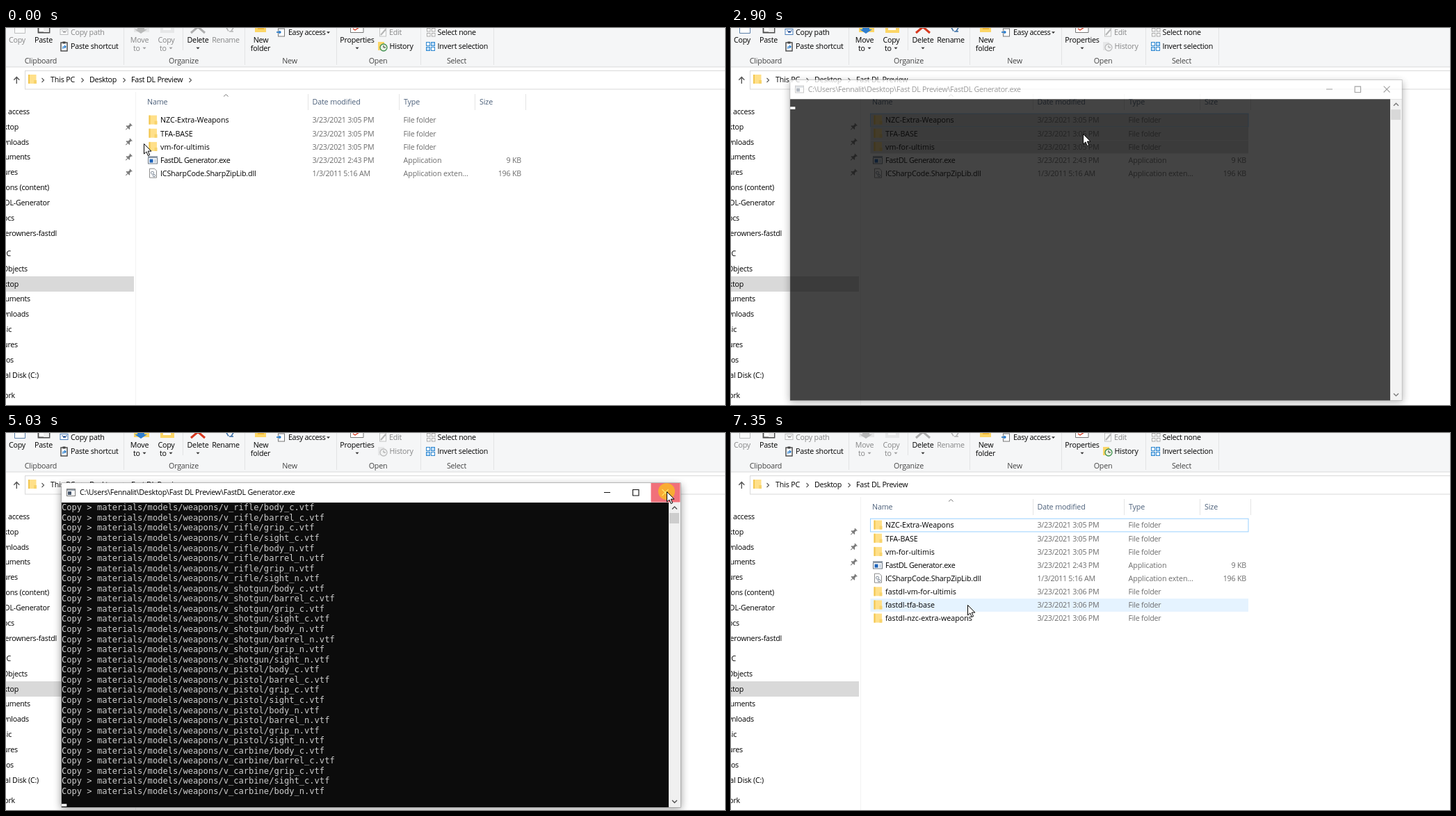
Recreate the animation shown at these times as an HTML page. Size 1034 by 542 pixels, loop 7.43 s.

```html
<!DOCTYPE html>
<html lang="en">
<head>
<meta charset="utf-8">
<title>Folder window</title>
<style>
html, body { margin: 0; width: 100%; height: 100%; overflow: hidden; background: #fff; }
svg { display: block; width: 100%; height: 100%; }
text { font: 10.7px "Open Sans", "Noto Sans", sans-serif; letter-spacing: -.22px; fill: #000; }
.grey { fill: #6d6d6d; }
.head { fill: #4c607a; }
.label { fill: #444; }
.mono text { font: 12.09px "DejaVu Sans Mono", "Noto Sans Mono", monospace; letter-spacing: 0; fill: #ccc; }
.dim, .act, .multi .his { opacity: .45; filter: grayscale(1); }
.sel .act { opacity: 1; filter: none; }
</style>
</head>
<body>
<svg id="stage" viewBox="0 0 1034 542" preserveAspectRatio="none">
  <defs><filter id="blur" x="-10%" y="-10%" width="120%" height="120%"><feGaussianBlur stdDeviation="6"/></filter></defs>
</svg>
<script>
const LOOP = 7430, ROW = 19.15, TOP = 123, LINE = 14.56, WIN_W = 890, WIN_H = 466;
const stage = document.getElementById('stage');

function el(tag, attrs, parent = stage, content = '') {
  const node = document.createElementNS('http://www.w3.org/2000/svg', tag);
  for (const k in attrs) node.setAttribute(k, attrs[k]);
  node.innerHTML = content;
  parent.appendChild(node);
  return node;
}
const esc = s => s.replace(/>/g, '&gt;');
const attr = (cls, x, y, anchor, gap) => `class="${cls}" x="${x}" y="${y}" text-anchor="${anchor}" style="${gap == null ? '' : `letter-spacing:${gap}px`}"`;
// y is the middle of the line
const text = (x, y, s, cls = '', anchor = 'start', gap) => `<text ${attr(cls, x, y + 3.8, anchor, gap)}>${esc(s)}</text>`;
const mid = (x, y, s, cls = '') => text(x, y, s, cls, 'middle');
const rect = (x, y, w, h, fill, extra = '') => `<rect x="${x}" y="${y}" width="${w}" height="${h}" fill="${fill}" ${extra}/>`;
const path = (d, stroke, w = 1, fill = 'none') => `<path d="${d}" stroke="${stroke}" stroke-width="${w}" fill="${fill}"/>`;
const caret = (x, y) => `<path d="M${x - 2.5} ${y - 1.2}h5l-2.5 2.8z" fill="#333"/>`;
const chevron = (x, y) => path(`M${x - 1.5} ${y - 3}l3 3l-3 3`, '#555', 1.1);
const group = (cls, s) => `<g class="${cls}">${s}</g>`;
const folder = (x, y) => rect(x, y, 11.5, 13, '#ffe08a') + rect(x, y, 2, 13, '#f2c64f') + rect(x + 8, y + 8, 4, 5, '#f7d36c');
const show = (node, on) => node.setAttribute('display', on ? 'inline' : 'none');
const place = (node, attrs) => { for (const k in attrs) node.setAttribute(k, attrs[k]); };

function ribbon() {
  let s = rect(0, 0, 1034, 56, '#f5f6f7') + rect(0, 55.5, 1034, 1, '#dadbdc');
  for (const x of [169, 343, 475, 596, 701]) s += rect(x, 0, 1, 53, '#e2e3e4');
  s += rect(254, 0, 1, 32, '#e2e3e4');
  s += group('act',
    path('M12.5 -2V7.5H27.5V-2', '#5a7fa8', 1, '#fff') + mid(16, 17, 'Copy') +
    rect(78, 1.5, 11, 8, '#fff', 'stroke="#4a7ebb"') + path('M80 4h2l1 3l1-3l1 3l1-3h2', '#2b579a') + text(93, 6.5, 'Copy path') +
    path('M184 -1h22v7h-22z', 'none', 0, '#fcd667') + path('M189 -1v3h-4l9 6l9-6h-4v-3z', 'none', 0, '#2f7fd0') +
    mid(192, 17, 'Move') + text(183, 29, 'to') + caret(199, 29) +
    rect(222, -1, 20, 8, '#fcd667') + rect(226, -1, 11, 4, '#fff') + mid(230.5, 17, 'Copy') + text(221, 29, 'to') + caret(237, 29) +
    path('M266 7l14-12M286 7l-14-12', '#d8391f', 3) +
    path('M316 -2l4 6.5M328 -2l-4 6.5M321 5h6', '#3a6ea5', 1.5) + mid(316, 17, 'Rename'));
  s += path('M46.5 -2V6.5H62.5V-2', '#4d4d4d', 1.8, '#fff') + rect(54, -1, 8, 7, '#eee') + mid(54, 17, 'Paste');
  s += rect(79, 21, 9, 12, '#fff', 'stroke="#444" stroke-width="1.4"') + rect(81.5, 19.5, 4, 3, '#444') + path('M82 30v-3h4m-2-2l2 2l-2 2', '#1a73c8', 1.2) + text(93, 26.5, 'Paste shortcut');
  s += mid(276, 17, 'Delete') + caret(276, 29);
  s += rect(358, -1, 16, 7, '#fcd667') + rect(362, -1, 9, 3, '#f2b93a') + mid(366.5, 17, 'New') + mid(366, 29, 'folder');
  s += rect(391.5, 1, 9, 11, '#fff', 'stroke="#777"') + path('M389 6h6m-2-2l2 2l-2 2', '#1a73c8', 1.3) + text(406, 6.5, 'Easy access', '', 'start', -.35) + caret(463.5, 6.5);
  s += path('M495.5 -2V6.5H514V-2', '#777', 1, '#fff') + path('M499 1l3 2l6-4', '#d8391f', 1.2) + mid(505, 17, 'Properties') + caret(505, 29);
  s += group('dim', rect(537.5, 0, 9, 12, '#fff', 'stroke="#888"') + path('M539 10l7-8', '#3a6ea5', 2) + text(551, 6.5, 'Edit'));
  s += group('his', rect(535, 20, 9, 12, '#fcd667') + '<circle cx="543" cy="28" r="5" fill="#e8f3e3" stroke="#3f8f4f" stroke-width="1.3"/>' +
    path('M543 25v3h3', '#333') + text(551.5, 26.5, 'History'));
  for (let i = 0; i < 4; i++) {
    const x = i % 2 * 7, y = (i >> 1) * 7;
    s += rect(605.5 + x, .5 + y, 4.5, 4.5, '#fff', 'stroke="#aaa"');
    s += rect(604.5 + x, 20.5 + y, 5, 5, i % 3 ? '#bcdcf7' : '#fff', 'stroke="#2b86d0"');
  }
  s += text(620.5, 6.5, 'Select none') + text(620.5, 26.5, 'Invert selection');
  [[50, 'Clipboard'], [255.5, 'Organize'], [408, 'New'], [535, 'Open'], [648, 'Select']].forEach(([x, t]) => s += mid(x, 47, t, 'label'));
  return s;
}

function addressBar() {
  return rect(27.5, 61.5, 1020, 26.5, '#fff', 'stroke="#d9d9d9"') +
    path('M15.3 80v-9.5m-4 4.2l4-4.2l4 4.2', '#555', 1.4) + folder(32, 67) +
    text(64, 74.5, 'This PC', '', 'start', -.17) + text(120, 74.5, 'Desktop', '', 'start', -.33) + text(180, 74.5, 'Fast DL Preview', '', 'start', -.23) +
    chevron(53, 75) + chevron(110, 75) + chevron(170, 75);
}

function sidebar() {
  let s = rect(0, 357, 184, 22, '#d9d9d9') + rect(186, 92, 1, 450, '#f3f3f3');
  const blocks = [
    [120, ['Quick access', 34], ['Desktop', 18], ['Downloads', 33], ['Documents', 35], ['Pictures', 17],
      ['addons (content)', 62], ['FastDL-Generator', 63], ['docs', 12], ['erowners-fastdl', 73]],
    [324, ['This PC', 7], ['3D Objects', 31], ['Desktop', 18], ['Documents', 35], ['Downloads', 33],
      ['Music', 8], ['Pictures', 17], ['Videos', 11], ['Local Disk (C:)', 47]],
    [528, ['Network', 13]]
  ];
  for (const [y, ...items] of blocks)
    items.forEach(([name, end], i) => s += text(end, y + i * 21.88, name, '', 'end'));
  for (let i = 0; i < 4; i++)
    s += `<g transform="translate(176.5 ${142 + i * 21.9}) rotate(45)"><path d="M-2.5-5h5v1.2h-1v3.3l2 1.7v1h-7v-1l2-1.7v-3.3h-1z" fill="#7b7b7b"/><path d="M0 2v4" stroke="#7b7b7b"/></g>`;
  return s;
}

function listHead() {
  let s = path('M313 98.5l3.3-3l3.3 3', '#777');
  [[203, 'Name'], [440.5, 'Date modified'], [572, 'Type'], [681, 'Size']].forEach(([x, t]) => s += text(x, 106.5, t, 'head', 'start', -.13));
  for (const x of [434, 565, 674, 747]) s += rect(x, 95, 1, 23, '#e5e5e5');
  return s;
}

const files = [
  ['NZC-Extra-Weapons', -.05], ['TFA-BASE', 0], ['vm-for-ultimis', 0.05],
  ['FastDL Generator.exe', -.36, '3/23/2021 2:43 PM', 'Application', '9 KB'],
  ['ICSharpCode.SharpZipLib.dll', -.16, '1/3/2011 5:16 AM', 'Application exten...', '196 KB'],
  ['fastdl-vm-for-ultimis', .03], ['fastdl-tfa-base', -.03], ['fastdl-nzc-extra-weapons', 0]
];
function fileRow([name, gap, date, type, size], i) {
  const y = TOP + (i + .5) * ROW, icons = {
    3: rect(204.5, y - 5, 13, 10, '#fff', 'stroke="#6b7683"') + rect(204, y - 5.5, 14, 2.5, '#8b97a5') + rect(206.5, y - 1.5, 5, 5, '#1c62b9') + rect(213, y - 1.5, 3, 5, '#c9d4e0'),
    4: path(`M206.5 ${y - 7}h7l3 3v10h-10z`, '#8c8c8c', 1, '#fff') + `<circle cx="210.5" cy="${y - 1}" r="2" fill="none" stroke="#7d8896"/><circle cx="213" cy="${y + 3}" r="1.7" fill="none" stroke="#7d8896"/>`
  };
  return (icons[i] || folder(205.5, y - 7)) + text(222, y, name, '', 'start', gap) +
    text(440.5, y, date || `3/23/2021 3:0${i < 3 ? 5 : 6} PM`, 'grey', 'start', -.27) +
    text(571.5, y, type || 'File folder', 'grey', 'start', type ? -.08 : -.22) + text(741, y, size || '', 'grey', 'end');
}

// Folder view
el('g', {}, stage, rect(0, 0, 1034, 542, '#fff') + ribbon() + addressBar() + sidebar() + listHead());
const lastChevron = el('g', {}, stage, chevron(265, 75));
const bars = files.map((_, i) => el('rect', { x: 200.5, y: TOP + i * ROW + .2, width: 543.5, height: ROW - .4 }));
const rows = files.map((f, i) => el('g', {}, stage, fileRow(f, i)));
const band = el('rect', { fill: '#0078d7', 'fill-opacity': .25, stroke: '#0078d7' });

// Console output
const weapons = 'materials/models/weapons/';
const set = (dir, stem, ends, ext) => ends.split(' ').map(e => `${weapons}${dir}_arms/${stem}${e && '_' + e}.${ext}`);
const vm = 'mtl_viewmodel_', rus = 'rus_prisoner', haz = 'usa_hazmat', pow = 'usa_pow', nva = 'vtn_nva_camo', nvaDir = 'vtn_nva_standard';
const armLines = [
  ...set(rus, vm + rus, ' alpha', 'vmt'), ...set(haz, vm + haz, ' s', 'vmt'),
  ...set(pow, vm + pow, 'left right', 'vmt'), ...set(nvaDir, vm + nva, ' alpha skin', 'vmt'),
  ...set(rus, 'gviewarm_' + rus, 'alpha_c c', 'vtf'), ...set(rus, 'viewarm_' + rus, 'n o', 'vtf'),
  ...set(haz, 'viewarm_' + haz, 'c n o s', 'vtf'), ...set(pow, 'viewarm_' + pow, 'left_ao left_c left_n', 'vtf'),
  ...set(nvaDir, 'gviewarm_' + nva, 'alpha_c', 'vtf'), ...set(nvaDir, 'viewarm_' + nva, 'c n o', 'vtf'),
  'models/weapons/viewmodel_rus_prisoner_arms.mdl'
];
const effectLines = Array.from({ length: 29 }, (_, i) => 'materials/effects/' +
  (i == 1 ? 'muzzleflashx_nemole' : `scotchmuzzleflash${i < 3 ? 'x' : i - 2}`) + '.vmt');
const gunLines = Array.from({ length: 29 }, (_, i) =>
  `${weapons}v_${['rifle', 'shotgun', 'pistol', 'carbine'][i >> 3]}/${['body', 'barrel', 'grip', 'sight'][i % 4]}_${'cn'[(i >> 2) % 2]}.vtf`);

const title = 'C:\\Users\\Fennalit\\Desktop\\Fast DL Preview\\FastDL Generator.exe';
function makeWindow(w) {
  w.g = el('g', {});
  el('g', {}, w.g, rect(-1, 3, WIN_W + 2, WIN_H, '#000', 'filter="url(#blur)" opacity=".38"') +
    rect(-.5, -.5, WIN_W + 1, WIN_H + 1, '#8a8a8a') + rect(0, 0, WIN_W, 28, '#fff') + rect(0, 28, WIN_W - 17, WIN_H - 28, '#0c0c0c') +
    rect(WIN_W - 17, 28, 17, WIN_H - 28, '#f0f0f0') + rect(WIN_W - 16, 43, 14, 15, '#cdcdcd') +
    path('M878 37.5l3.5-3.5l3.5 3.5M878 456l3.5 3.5l3.5-3.5', '#505050', 1.4));
  w.maxHot = el('rect', { x: 805, y: 0, width: 41, height: 27.5, fill: '#e1e1e1' }, w.g);
  w.closeHot = el('rect', { x: 847.5, y: 0, width: 42, height: 27.5 }, w.g);
  w.bar = el('g', {}, w.g, rect(7.5, 8.5, 12, 10, '#fff', 'stroke="#777"') + rect(8, 9, 11, 2, '#9aa5b0') + rect(9, 12, 5, 5, '#46566b') +
    text(26, 13.5, title, '', 'start', -.23) + path('M780 13.5h9M821.5 9.5h8.5v8.5h-8.5z', '#111', 1.1));
  w.cross = el('path', { d: 'M863.5 9l9 9m0-9l-9 9', 'stroke-width': 1.1 }, w.g);
  const body = el('g', { class: 'mono' }, w.g);
  w.text = w.lines.map((s, i) => el('text', { x: 0, y: 39.3 + i * LINE }, body, esc('Copy > ' + s)));
  w.caret = el('rect', { x: 0, width: 7.3, height: 3.6, fill: '#fff' }, w.g);
}
// from: first visible time, start: fade-in begins, close: fade-out begins, count: [time, lines]
const windows = [
  { x: 56, y: 48, from: 2340, start: 2263, close: 2715, fade: 120, lines: [], count: [[0, 0]] },
  { x: 80, y: 72, from: 2800, start: 2761, close: 5080, fade: 170, top: 4850, lines: gunLines,
    count: [[3140, 0], [3150, 1], [3370, 1], [3990, 24], [4130, 24], [4390, 29]] },
  { x: 104, y: 96, from: 2980, start: 2940, close: 4850, fade: 150, top: 4620, lines: effectLines,
    count: [[3140, 0], [3150, 1], [3340, 4], [3420, 6], [3990, 24], [4130, 24], [4390, 29]] },
  { x: 128, y: 120, from: 3190, start: 3165, close: 4620, fade: 150, top: 0, lines: armLines,
    count: [[3290, 0], [3300, 1], [3400, 1], [3490, 4], [3990, 20], [4130, 20], [4140, 21], [4390, 25]] }
];
windows.forEach(makeWindow);

// Dragged stack, press mark, pointer
const drag = el('g', {});
const stack = el('g', { opacity: .75 }, drag);
for (let i = 2; i >= 0; i--)
  stack.innerHTML += `<g transform="translate(${i * 5 - 30} ${-76 - i * 5})">${rect(0, 0, 50, 66, '#ffe08a', 'stroke="#eec95c"') + rect(0, 0, 8, 66, '#f2c64f')}</g>`;
el('g', {}, drag, rect(-10, -49, 20, 19, '#0078d7', 'stroke="#fff"') + mid(0, -39.5, '3').replace('style="', 'style="fill:#fff;'));
const tip = el('g', {}, drag, rect(-2.5, 11.5, 171, 17, '#fff', 'stroke="#b5b5b5"') + path('M2 20h8m-3.5-3.5l3.5 3.5l-3.5 3.5', '#1a73c8', 1.6) +
  text(14, 20, 'Open with FastDL Generator.exe', '', 'start', -.3));
const press = el('circle', { r: 12, fill: '#ffd800', opacity: .58 });
const pointer = el('path', { d: 'M0 0V14.5L3.4 11.4L5.8 17L8.1 16L5.7 10.6H10.4Z', fill: '#fff', stroke: '#000', 'stroke-width': 1 });

const route = [[0, 198, 166], [320, 198, 167], [1030, 300, 128], [1130, 300, 130], [1570, 280, 185], [2740, 280, 185],
  [2900, 505, 152], [3350, 966, 140], [3700, 989, 132], [4620, 989, 132], [4770, 973, 110], [4850, 973, 110], [5000, 950, 84],
  [5470, 950, 84], [5720, 457, 167], [6190, 240, 212], [6650, 214, 302], [6870, 214, 302], [7350, 340, 247]];
const presses = [[320, 1030], [1100, 1940], [4540, 4620], [4770, 4850], [5010, 5080], [6800, 6870]];

function track(keys, t, n = 1) {
  const last = keys[keys.length - 1];
  if (t <= keys[0][0]) return keys[0][n];
  if (t >= last[0]) return last[n];
  const i = keys.findIndex(k => k[0] > t), a = keys[i - 1], b = keys[i];
  return a[n] + (b[n] - a[n]) * (t - a[0]) / (b[0] - a[0]);
}
const clamp = v => Math.max(0, Math.min(1, v));

function drawWindow(w, t, x, y, down) {
  const live = t >= w.from && t < w.close + w.fade;
  show(w.g, live);
  if (!live) return;
  const inn = 1 - (1 - clamp((t - w.start) / 270)) ** 2;
  const a = inn * (1 - clamp((t - w.close) / w.fade)), k = .95 + .05 * a;
  place(w.g, { opacity: a, transform: `translate(${w.x + WIN_W / 2 * (1 - k)} ${w.y + WIN_H / 2 * (1 - k)}) scale(${k})` });
  const active = t >= w.top, px = x - w.x, py = y - w.y, inBar = active && py >= 0 && py < 28;
  const overClose = inBar && px >= 847 && px < WIN_W;
  show(w.maxHot, inBar && px >= 804 && px < 846);
  show(w.closeHot, overClose);
  place(w.closeHot, { fill: down ? '#f1707a' : '#e81123' });
  place(w.bar, { opacity: active ? 1 : .5 });
  place(w.cross, { stroke: overClose ? '#fff' : active ? '#111' : '#888' });
  const n = Math.floor(track(w.count, t) + .001);
  w.text.forEach((node, i) => show(node, i < n));
  show(w.caret, active || n === 0);
  place(w.caret, { y: 28 + n * LINE + 11 });
}

function draw(t) {
  const x = track(route, t, 1), y = track(route, t, 2);
  const down = presses.some(([a, b]) => t >= a && t < b);
  const banding = t >= 320 && t < 1030, dragging = t >= 1180 && t < 1940;
  stage.setAttribute('class', (t >= 390 && t < 6800 ? 'sel ' : '') + (t >= 1100 && t < 6800 ? 'multi' : ''));
  show(lastChevron, t < 1030 || (t >= 5080 && t < 5900));

  const hit = x >= 200 && x < 745 ? Math.floor((y - TOP) / ROW) : -1;
  const free = (t >= 1030 && t < 2740) || t >= 5470;
  // the selection greys while a console has the focus
  const picked = t >= 2570 && t < 5080 ? '#d9d9d9' : '#cce8ff';
  bars.forEach((bar, i) => {
    const exists = i < 5 || t >= 3400;
    const chosen = i < 3 && t >= 320 && t < 6800 && (t >= 1030 || y < TOP + (i + 1) * ROW);
    const over = free && exists && hit === i;
    const target = i === 3 && over && t < 2090;
    const edge = (i === 0 && t >= 1030) || (chosen && over);
    place(bar, { fill: chosen || target ? picked : over ? '#e5f3ff' : 'none', stroke: edge ? '#99d1ff' : 'none' });
    show(rows[i], exists);
  });

  show(band, banding);
  place(band, { x: 198.5, y: Math.min(y, 167) + .5, width: Math.max(0, x - 198), height: Math.abs(167 - y) });
  windows.forEach(w => drawWindow(w, t, x, y, down));

  show(drag, dragging);
  show(tip, hit === 3);
  place(drag, { transform: `translate(${x} ${y})` });
  show(press, down);
  place(press, { cx: x, cy: y });
  place(pointer, { transform: `translate(${x + .5} ${y + .5})` });
}

function tick() {
  draw(performance.now() % LOOP);
  requestAnimationFrame(tick);
}
tick();
</script>
</body>
</html>
```
